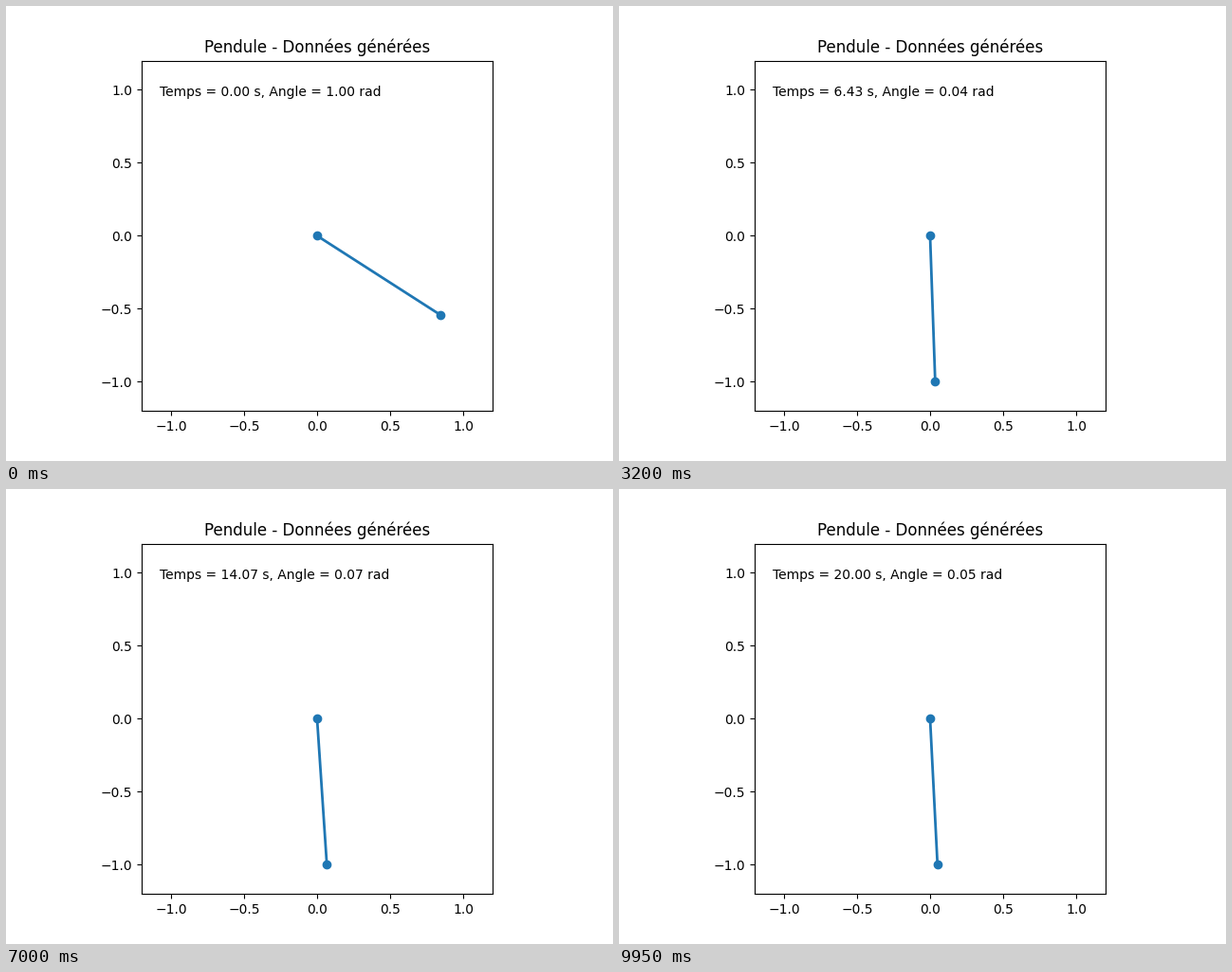
A matplotlib script for the animation above (10000 ms loop, 640 px wide and 480 px high).

```python
import numpy as np
import matplotlib.pyplot as plt
from matplotlib.animation import FuncAnimation

FRAMES = 200
INTERVAL = 50
DURATION = 20.0
OMEGA = 3.145
FAST_DECAY = 0.335
SLOW_DECAY = 0.035
SLOW_SHARE = 0.1


def swing(t):
    """Pendulum angle: quick damping that leaves a small lasting swing."""
    fast = (1 - SLOW_SHARE) * np.exp(-FAST_DECAY * t)
    slow = SLOW_SHARE * np.exp(-SLOW_DECAY * t)
    return (fast + slow) * np.cos(OMEGA * t)


times = np.linspace(0, DURATION, FRAMES)

fig, ax = plt.subplots(figsize=(6.4, 4.8), dpi=100)
ax.set_xlim(-1.2, 1.2)
ax.set_ylim(-1.2, 1.2)
ax.set_aspect("equal")
ax.set_title("Pendule - Données générées")
rod, = ax.plot([], [], "o-", lw=2)
label = ax.text(0.05, 0.9, "", transform=ax.transAxes)


def update(i):
    t = times[i]
    theta = swing(t)
    rod.set_data([0, np.sin(theta)], [0, -np.cos(theta)])
    label.set_text(f"Temps = {t:.2f} s, Angle = {theta:.2f} rad")
    return rod, label


anim = FuncAnimation(fig, update, frames=FRAMES, interval=INTERVAL,
                     repeat=True, repeat_delay=0)
plt.show()
```
